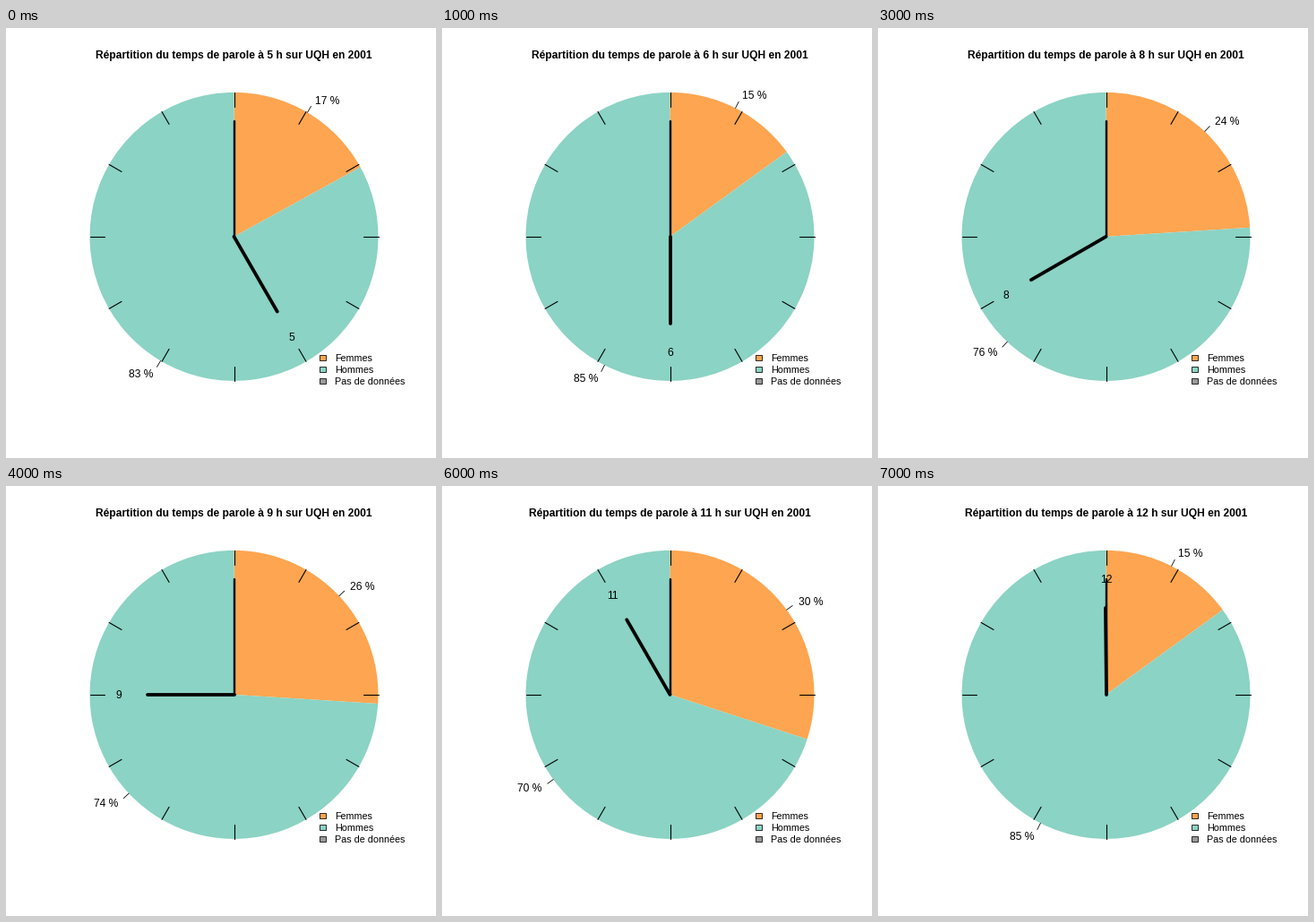
Write a matplotlib script that moves like this. It is 480x480 px and loops after 8 s.

```python
import numpy as np
import matplotlib.pyplot as plt
from matplotlib.animation import FuncAnimation
from matplotlib.patches import Rectangle, Wedge

SIZE, DPI = 480, 100
PX = 72 / DPI  # points per pixel
CX, CY, R = 254.5, 232.9, 161
ORANGE, TEAL, GREY = "#fda550", "#8bd3c4", "#999999"
STATION = "UQH"
FIRST_HOUR = 5
WOMEN = [17, 15, 19, 24, 26, 32, 30, 15]  # percent, one value per hour

plt.rcParams["font.family"] = "Liberation Sans"
fig = plt.figure(figsize=(SIZE / DPI, SIZE / DPI), dpi=DPI, facecolor="white")
ax = fig.add_axes([0, 0, 1, 1])
ax.set_xlim(0, SIZE)
ax.set_ylim(SIZE, 0)
ax.axis("off")


def polar(turn, radius):
    """Point at a clockwise fraction of a turn from noon."""
    a = 2 * np.pi * turn
    return CX + R * radius * np.sin(a), CY - R * radius * np.cos(a)


def ray(turn, r0, r1):
    return tuple(zip(polar(turn, r0), polar(turn, r1)))


def line(xy, width, cap="round", z=3):
    return ax.plot(*xy, color="black", lw=width * PX, solid_capstyle=cap, zorder=z)[0]


def label(x, y, text="", size=12, **kw):
    return ax.text(x, y, text, fontsize=size * PX, va="baseline", zorder=5, **kw)


def pie_slice(color):
    return ax.add_patch(Wedge((CX, CY), R, -90, 0, fc=color, ec="none", zorder=1))


women, men = pie_slice(ORANGE), pie_slice(TEAL)
title = label(CX, 34.2, ha="center", weight="bold")
women_text, men_text = label(0, 0, ha="left"), label(0, 0, ha="right")
women_lead, men_lead = (line(([], []), 0.8) for _ in range(2))
hour_text = label(0, 0, ha="center")

for k in range(12):
    line(ray(k / 12, 0.9, 1), 1.1)
line(ray(0, 0, 0.8), 2.4)
hour_hand = line(([], []), 3.8, z=4)

for k, (name, color) in enumerate([("Femmes", ORANGE), ("Hommes", TEAL),
                                   ("Pas de données", GREY)]):
    y = 364.5 + 13 * k
    ax.add_patch(Rectangle((349.5, y), 7.5, 6.3, fc=color, ec="black",
                           lw=0.8 * PX, zorder=4))
    label(366.8, y + 7.7, name, 10.8)


def place(text, lead, turn, percent):
    x, y = polar(turn, 1.1)
    text.set_position((x, y + 4.3))
    text.set_text(f"{percent} %")
    lead.set_data(*ray(turn, 1, 1.05))


def update(i):
    hour, share = FIRST_HOUR + i, WOMEN[i]
    title.set_text(f"Répartition du temps de parole à {hour} h sur {STATION} en 2001")
    edge = -90 + 3.6 * share
    women.set_theta2(edge)
    men.set_theta1(edge)
    men.set_theta2(270)
    place(women_text, women_lead, share / 200, share)
    place(men_text, men_lead, 0.5 + share / 200, 100 - share)
    hour_hand.set_data(*ray(hour / 12, 0, 0.6))
    x, y = polar(hour / 12, 0.8)
    hour_text.set_position((x, y + 4.3))
    hour_text.set_text(str(hour))
    return []


anim = FuncAnimation(fig, update, frames=len(WOMEN), interval=1000,
                     repeat=True, repeat_delay=0, blit=False)
plt.show()
```
